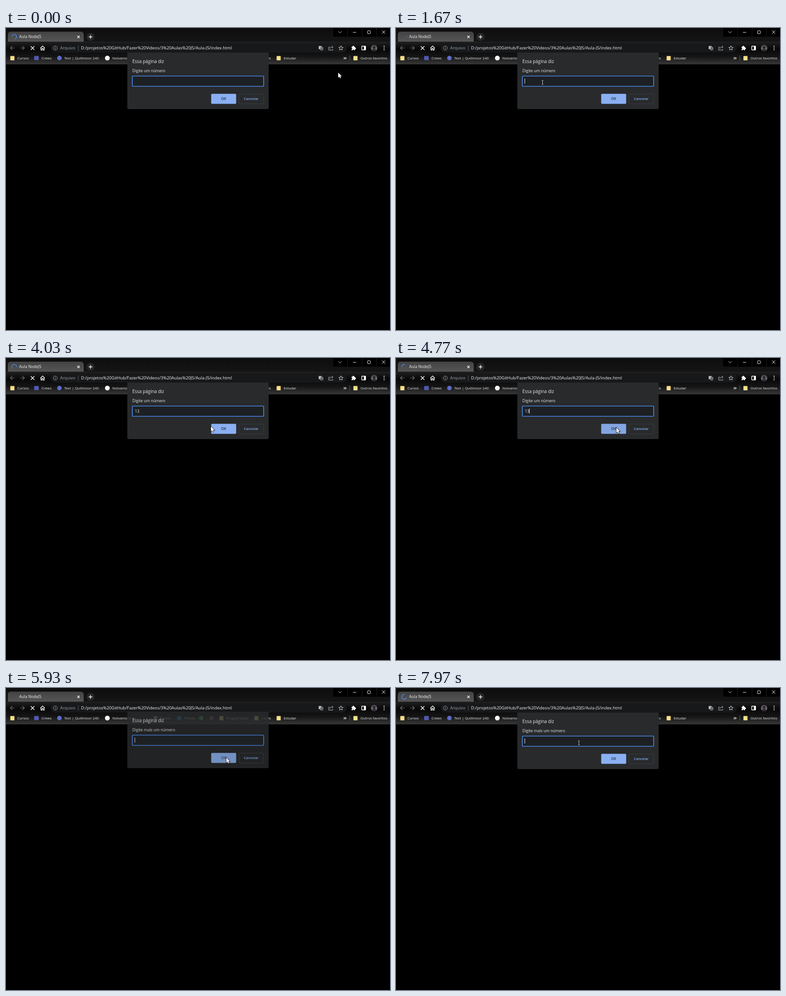
These frames come from a looping animation (845 by 663 pixels, 8000 ms). An HTML page with a canvas:

```html
<!DOCTYPE html>
<html lang="pt-BR">
<head>
<meta charset="utf-8">
<title>Prompt</title>
<style>
html, body { margin: 0; width: 100%; height: 100%; overflow: hidden; background: #000; }
canvas { display: block; width: 845px; height: 663px; }
</style>
</head>
<body>
<canvas id="stage" width="845" height="663"></canvas>
<script>
const ctx = document.getElementById('stage').getContext('2d');
const LOOP = 8000;
const FONT = '"Open Sans", "Noto Sans", sans-serif';
const LIGHT = '#e8eaed';
const TYPED = [[2950, '1'], [3300, '13']];
const CLOSE = 5620, CLOSED = 5740, OPEN = 5830, OPENED = 6000;

// time, x, y of the mouse pointer
const PATH = [
  [0, 731, 98], [150, 731, 98], [830, 330, 120], [1300, 322, 119],
  [1700, 322, 119], [2200, 328, 117], [3450, 328, 117], [3800, 430, 148],
  [4030, 451, 150], [4350, 485, 153], [6150, 485, 153], [6650, 402, 120], [LOOP, 402, 120]
];

const clamp = v => Math.min(1, Math.max(0, v));
const smooth = v => v * v * (3 - 2 * v);
const ramp = (t, a, b) => clamp((t - a) / (b - a));

function text(str, x, y, size, color = LIGHT, weight = 400, align = 'left') {
  ctx.font = `${weight} ${size}px ${FONT}`;
  ctx.textAlign = align;
  ctx.fillStyle = color;
  ctx.fillText(str, x, y);
}

function rect(x, y, w, h, color) {
  ctx.fillStyle = color;
  ctx.fillRect(x, y, w, h);
}

function box(x, y, w, h, r, fill, stroke, width = 1) {
  ctx.beginPath();
  ctx.roundRect(x, y, w, h, r);
  if (fill) { ctx.fillStyle = fill; ctx.fill(); }
  if (stroke) { ctx.strokeStyle = stroke; ctx.lineWidth = width; ctx.stroke(); }
}

function disc(x, y, r, color) {
  ctx.beginPath();
  ctx.arc(x, y, r, 0, 7);
  ctx.fillStyle = color;
  ctx.fill();
}

function ring(x, y, r, color, width = 1) {
  ctx.beginPath();
  ctx.arc(x, y, r, 0, 7);
  ctx.strokeStyle = color;
  ctx.lineWidth = width;
  ctx.stroke();
}

function stroke(d, x, y, color, width = 1.2) {
  ctx.save();
  ctx.translate(x, y);
  ctx.strokeStyle = color;
  ctx.lineWidth = width;
  ctx.stroke(new Path2D(d));
  ctx.restore();
}

function vertical(y0, y1, ...colors) {
  const g = ctx.createLinearGradient(0, y0, 0, y1);
  colors.forEach((c, i) => g.addColorStop(i / (colors.length - 1), c));
  return g;
}

function bezierEase(p) {
  // cubic-bezier(.4, 0, .2, 1) solved by bisection
  let lo = 0, hi = 1, u = p;
  for (let i = 0; i < 16; i++) {
    u = (lo + hi) / 2;
    const x = 3 * (1 - u) ** 2 * u * 0.4 + 3 * (1 - u) * u * u * 0.2 + u ** 3;
    if (x < p) lo = u; else hi = u;
  }
  return 3 * u * u - 2 * u ** 3;
}

function spinner(t) {
  const half = 2000 / 3, e = t + 109;
  const step = Math.floor(e / half);
  let sweep = 270 * bezierEase((e % half) / half) - (step % 2 ? 0 : 270);
  if (Math.abs(sweep) < 5) sweep = step % 2 ? 5 : -5;
  const start = 70 + 360 * t / 1568 + 270 * Math.floor(step / 2);
  const rad = Math.PI / 180;
  ctx.beginPath();
  ctx.arc(18, 19.3, 5.2, start * rad, (start + sweep) * rad, sweep < 0);
  ctx.strokeStyle = '#4b86e8';
  ctx.lineWidth = 1.5;
  ctx.stroke();
}

function tabStrip(t) {
  rect(0, 0, 845, 30, vertical(0, 30, '#0d0d0d', '#151515'));
  box(4, 8, 167, 28, 6, vertical(8, 31, '#434343', '#565656'));
  spinner(t);
  text('Aula NodeJS', 29, 22.3, 8.6, '#f1f1f1');
  stroke('M-2.5-2.5L2.5 2.5M2.5-2.5L-2.5 2.5', 159.5, 19.5, '#fff');
  disc(186, 19.5, 9, '#262626');
  stroke('M-4 0H4M0-4V4', 186, 19.5, '#fff', 1.4);

  rect(720, 0, 125, 19, '#000');
  for (const x of [751, 783, 815]) rect(x, 0, 1, 19, '#1c1c1c');
  stroke('M-3.5-1.7L0 1.8L3.5-1.7', 735, 9, '#ddd', 1);
  stroke('M-3.5 .5H3.5', 767, 9, '#eee', 1);
  box(795.5, 6, 6.5, 6.5, 1.5, null, '#eee');
  stroke('M-3.5-3.5L3.5 3.5M3.5-3.5L-3.5 3.5', 831, 9, '#eee', 1);
}

function puzzle(x, y) {
  rect(x - 4.5, y - 2.8, 7.5, 7.5, '#fff');
  disc(x - 0.7, y - 3.3, 1.8, '#fff');
  disc(x + 3.4, y + 0.8, 1.8, '#fff');
  disc(x - 4.3, y + 1, 1.3, '#111');
  disc(x - 0.7, y + 4.6, 1.3, '#111');
}

function star(x, y) {
  ctx.beginPath();
  for (let i = 0; i < 10; i++) {
    const r = i % 2 ? 2.3 : 5.2, a = (i * 36 - 90) * Math.PI / 180;
    ctx.lineTo(x + r * Math.cos(a), y + r * Math.sin(a));
  }
  ctx.closePath();
  ctx.strokeStyle = '#d5d5d5';
  ctx.lineWidth = 1;
  ctx.stroke();
}

function toolbar() {
  rect(0, 30, 845, 49, vertical(30, 79, '#202020', '#080808', '#151515', '#363636'));
  rect(0, 79, 845, 1, '#292929');
  box(98, 34, 652, 20, 10, '#17181a');
  stroke('M5 0H-4M0-4.3L-4.5 0L0 4.3', 14, 44, '#707070');
  stroke('M-5 0H4M0-4.3L4.5 0L0 4.3', 36, 44, '#707070');
  stroke('M-4-4L4 4M4-4L-4 4', 58.5, 44, '#fff', 1.5);
  stroke('M-5 .2L0-4.5L5 .2M-3.5-.5V4.5H-1.2V1H1.2V4.5H3.5V-.5', 80.5, 44, '#fff', 1.3);
  ring(108.5, 44, 4.4, '#9aa0a6');
  rect(108, 43.3, 1, 3.2, '#9aa0a6');
  rect(108, 41.2, 1, 1.2, '#9aa0a6');
  text('Arquivo', 119, 47.3, 9.35, '#9aa0a6');
  rect(158.5, 38, 1, 12, '#55585c');
  text('D:/projetos%20GitHub/Fazer%20Videos/3%20Aulas%20JS/Aula-JS/index.html', 165, 47.3, 9.35, '#f1f3f4');

  box(688, 39.5, 6.5, 7, 1, '#b9b9b9');
  box(692, 42, 5.5, 6.5, 1, '#333', '#b9b9b9', 0.9);
  stroke('M-2 0H2M0-1V0M-1.3 2.5L1.4 0', 694.8, 44.5, '#ccc', 0.7);
  stroke('M-2-2H-5V4.5H4V2M-2.3 2C-2-1 0-2.2 4-2.2M2-4.8L4.7-2.2L2 .4', 715, 44, '#c9c9c9', 0.9);
  star(737, 44.2);
  puzzle(765, 44);
  box(782.8, 39.8, 8.5, 8.5, 1, null, '#fff', 1.5);
  rect(787.5, 40, 4, 8, '#fff');
  portrait(810, 44);
  for (const y of [40.2, 44, 47.8]) disc(832, y, 1.1, '#fff');
}

function portrait(x, y) {
  ctx.save();
  ctx.beginPath();
  ctx.arc(x, y, 7, 0, 7);
  ctx.clip();
  rect(x - 7, y - 7, 14, 14, vertical(y - 7, y + 7, '#45414a', '#8b8588'));
  disc(x, y - 1.5, 2.6, '#241f25');
  disc(x, y + 6, 4.8, '#302a35');
  ctx.restore();
}

function folder(x, label) {
  box(x, 61.5, 9, 9.5, 1, '#fbe08a');
  rect(x + 7.5, 62.5, 1.5, 3, '#e3bd55');
  text(label, x + 15.5, 69, 7.8);
}

function bookmarks() {
  folder(9.5, 'Cursos');
  box(62, 61.5, 10, 9, 1, '#5358b4');
  text('Crews', 78, 69, 7.9);
  disc(117.5, 66, 5, '#5d6bc9');
  text('Text | Quillmoor 240', 128, 69, 7.9);
  disc(223, 66, 5.3, '#f4f4f4');
  text('Nolvanio Dias', 234, 69, 7.9);
  disc(329, 66, 4.5, '#a8a8a8');
  text('Painel', 339, 69, 7.9);
  box(376.5, 61.5, 9, 9, 1, '#2684c7');
  text('Planko', 392, 69, 7.9);
  disc(429.5, 66, 5, '#34b653');
  disc(452, 66, 4.5, '#b84a5e');
  folder(469.5, 'Programação');
  folder(546.5, 'Cores');
  folder(595.5, 'Estudar');
  stroke('M-2.7-2.2L-.5 0L-2.7 2.2M.5-2.2L2.7 0L.5 2.2', 746, 66.3, '#fff', 1.1);
  rect(756, 60, 1, 11, '#5a5a5a');
  folder(764.5, 'Outros favoritos');
}

function caretOn(t) {
  if (t >= OPEN) return (t - OPEN) % 1000 < 500;
  const last = TYPED.filter(k => k[0] <= t).pop();
  const since = last ? t - last[0] : t + 600;
  return since % 1000 < 500;
}

function dialog(t, mouse) {
  const second = t >= OPEN;
  const shown = second ? ramp(t, OPEN, OPENED) : 1 - ramp(t, CLOSE, CLOSED);
  if (shown <= 0) return;
  const eased = 1 - (1 - shown) ** 2;
  ctx.save();
  ctx.globalAlpha = eased;
  ctx.translate(0, -Math.round(12 * (1 - eased)));

  box(267, 54, 311, 124, [0, 0, 3, 3], '#282a2c');
  text('Essa página diz', 278, 77, 9.9);
  text(second ? 'Digite mais um número' : 'Digite um número', 278, 96.5, 8.6);
  box(278, 105.5, 289, 22.5, 1.5, '#1d2023', '#4a85e6', 1.7);

  const value = second ? '' : (TYPED.filter(k => k[0] <= t).pop() || [0, ''])[1];
  text(value, 283.5, 119.8, 8.6);
  if (caretOn(t)) {
    const w = value ? ctx.measureText(value).width : 0;
    rect(Math.round(283.5 + w - 0.4), 111, 1, 11, LIGHT);
  }

  const hover = mouse.x > 452 && mouse.x < 506 && mouse.y > 144 && mouse.y < 167;
  box(451.5, 144.5, 55, 22, 2, hover ? '#83a6e2' : '#8ab0f3');
  text('OK', 479, 158.4, 8, '#2b3340', 600, 'center');
  box(512.5, 145, 54.5, 21.5, 2, null, '#3b3e43');
  text('Cancelar', 539.5, 158.4, 7.7, '#8ab0f3', 600, 'center');
  ctx.restore();
}

function mouseAt(t) {
  const i = PATH.findIndex((p, n) => n && t <= p[0]);
  const [t0, x0, y0] = PATH[i - 1], [t1, x1, y1] = PATH[i];
  const p = smooth(ramp(t, t0, t1));
  return { x: x0 + (x1 - x0) * p, y: y0 + (y1 - y0) * p };
}

function pointer({ x, y }) {
  x = Math.round(x);
  y = Math.round(y);
  if (x > 277 && x < 568 && y > 104 && y < 129) {
    const bar = 'M-2-4.5H-.5L0-4L.5-4.5H2M0-4V4M-2 4.5H-.5L0 4L.5 4.5H2';
    stroke(bar, x + 0.5, y + 0.5, '#000', 2);
    stroke(bar, x + 0.5, y + 0.5, '#e6e6e6', 1);
    return;
  }
  const arrow = new Path2D('M0 0V11L2.5 8.7L4.2 12.4L6 11.6L4.4 8H7.8Z');
  ctx.save();
  ctx.translate(x, y);
  ctx.strokeStyle = '#000';
  ctx.lineWidth = 1.4;
  ctx.stroke(arrow);
  ctx.fillStyle = '#fff';
  ctx.fill(arrow);
  ctx.restore();
}

function draw(t) {
  rect(0, 0, 845, 663, '#000');
  tabStrip(t);
  toolbar();
  bookmarks();
  const mouse = mouseAt(t);
  dialog(t, mouse);
  pointer(mouse);
}

const begin = performance.now();
function tick() {
  draw((performance.now() - begin) % LOOP);
  requestAnimationFrame(tick);
}
tick();
</script>
</body>
</html>
```
